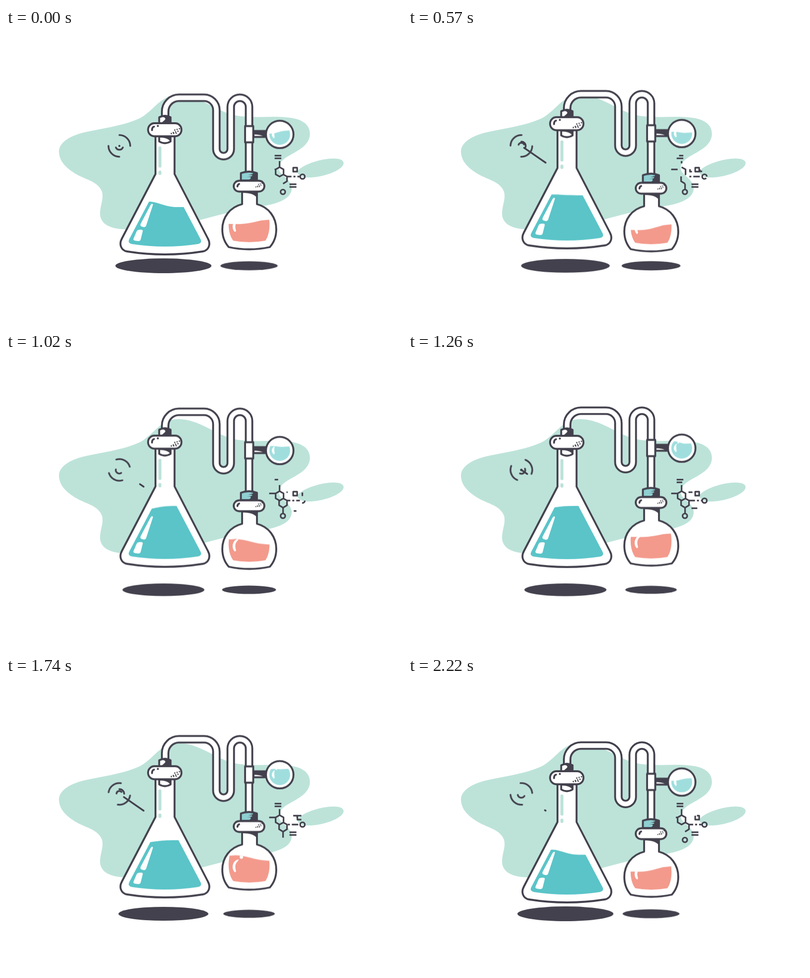
Recreate the animation shown at these times as an HTML page without scripts. Size 800x600 px, loop 2.25 s.

```html
<!DOCTYPE html>
<html lang="en">
<head>
<meta charset="utf-8">
<title>Distillation</title>
<style>
:root { --loop: 2250ms; --sine: cubic-bezier(.37,0,.63,1); }
html, body { margin: 0; width: 100%; height: 100%; overflow: hidden; background: #fff; }
svg { display: block; width: 100vw; height: 100vh; }
.ink { fill: none; stroke: #43414d; stroke-width: 3.8; stroke-linejoin: round; stroke-linecap: round; }
.glass { fill: #fff; }
.dark { fill: #43414d; stroke: none; }
.shine { fill: #fff; stroke: none; }
.mint { fill: #bde3d9; stroke: none; }

/* Parts rise and sink once per loop; --lag is the moment a part is lowest. */
.bob, .shadow {
  --low: 0px; --rise: 24px; --lag: 0ms;
  animation: bob calc(var(--loop) / 2) var(--sine) calc(var(--lag) - var(--loop)) infinite alternate;
}
.shadow { transform-box: fill-box; transform-origin: center; animation-name: shrink; }
@keyframes bob {
  from { transform: translateY(var(--low)); }
  to { transform: translateY(calc(var(--low) - var(--rise))); }
}
@keyframes shrink { to { transform: scale(.85); } }

/* Liquids rock three times per loop. */
.slosh { stroke: none; animation: calc(var(--loop) / 6) var(--sine) infinite alternate; }
.cone { fill: #5ac4c8; animation-name: cone; }
.round { fill: #f39a8c; animation-name: round; animation-delay: -485ms; }
.drop { fill: #a0dede; animation-name: drop; animation-delay: -323ms; }
@keyframes cone {
  from { d: path("M230-6H287C305-7 320 5 345 5Q365 5 410 4V130H230Z"); }
  to { d: path("M230 5H283C300 3 308-6 340-6Q365-6 410-5V130H230Z"); }
}
@keyframes round {
  from { d: path("M430-5H455C475-8 495 1 515 4Q530 6 550 6V70H430Z"); }
  to { d: path("M430 5H460C480 7 490 2 515-6Q530-9 550-9V70H430Z"); }
}
@keyframes drop {
  from { d: path("M525-3H537C545-4 552 4 562 3Q570 3 580 2V50H525Z"); }
  to { d: path("M525 3H537C545 3 552-2 562-3Q570-4 580-4V50H525Z"); }
}

/* Strokes wipe out and redraw, or flash in and out, at fraction --at of the loop. */
.molecule { stroke-width: 3.2; stroke-linecap: butt; }
.trim, .flash { animation: trim var(--loop) linear calc((var(--at) - 1) * var(--loop)) infinite; }
.flash { animation-name: flash; }
@keyframes trim {
  0% { stroke-dasharray: 100 999; stroke-dashoffset: 0; }
  12% { stroke-dasharray: 0 999; stroke-dashoffset: -100; }
  18% { stroke-dasharray: 0 999; stroke-dashoffset: 0; }
  30%, 100% { stroke-dasharray: 100 999; stroke-dashoffset: 0; }
}
@keyframes flash {
  0% { stroke-dasharray: 0 999; stroke-dashoffset: 0; }
  12%, 18% { stroke-dasharray: 100 999; stroke-dashoffset: 0; }
  30%, 100% { stroke-dasharray: 0 999; stroke-dashoffset: -100; }
}
.flow { stroke-dasharray: 13 4 4 4; animation: flow calc(var(--loop) / 2) linear infinite; }
@keyframes flow { from { stroke-dashoffset: 4; } to { stroke-dashoffset: -21; } }

.turn { animation: turn var(--loop) linear infinite; }
.back { animation: turn calc(var(--loop) / 2) linear infinite reverse; }
@keyframes turn { to { transform: rotate(360deg); } }
.smile, .ripple, .ray { animation: smile calc(var(--loop) / 2) linear infinite; }
.smile { vector-effect: non-scaling-stroke; }
.ripple { animation-name: ripple; }
.ray { animation-name: ray; }
@keyframes smile { 32% { transform: none; } 60% { transform: scale(.7); } }
@keyframes ripple {
  0% { r: .3px; stroke-dasharray: 360 360; animation-timing-function: ease-in; }
  32% { r: 2.8px; stroke-dasharray: 360 360; animation-timing-function: ease-out; }
  71% { visibility: visible; }
  72%, 100% { r: 12px; stroke-dasharray: 0 360; visibility: hidden; }
}
@keyframes ray {
  0% { stroke-dasharray: 0 999; stroke-dashoffset: 0; }
  50% { stroke-dasharray: 90 999; stroke-dashoffset: -10; }
  98% { visibility: visible; }
  99%, 100% { stroke-dasharray: 0 999; stroke-dashoffset: -100; visibility: hidden; }
}
</style>
</head>
<body>
<svg viewBox="0 0 800 600">
<defs>
  <clipPath id="coneClip"><path d="M303 325L249 428Q245 436 255 438Q321 448 387 438Q397 436 393 428L339 325Z"/></clipPath>
  <clipPath id="roundClip"><path d="M457 365C447 385 447 415 459 431Q491 437 524 431C535 415 535 385 525 365Z"/></clipPath>
  <clipPath id="bulbClip"><circle cx="553" cy="218.4" r="21"/></clipPath>
  <path id="tube" d="M321.5 197V170A28 28 0 0 1 349.5 142H400A25 25 0 0 1 425 167V246A14.5 14.5 0 0 0 454 246V160.500A18.5 18.5 0 0 1 491 160.500V313"/>
  <path id="speckles" stroke-width="2.8" stroke-dasharray="0 4.9" d="M341 207L351 204M338 212L349 209M334 214L348 213"/>
  <path id="hexagon" pathLength="100" d="M0-9.500L8-5V5L0 9.500L-8 5V-5Z"/>
</defs>

<g class="mint">
  <path d="M107 250C107 232 130 217 165 210C205 202 238 197 268 184C298 170 310 136 348 136C392 137 418 165 458 176C492 184 530 178 565 181C596 183 614 194 614 215C613 240 586 250 568 261C549 273 546 287 559 298C571 308 578 316 577 327C575 348 546 357 512 362C455 370 410 386 367 395C320 405 275 408 240 408C208 407 190 396 190 376C190 360 198 346 194 332C186 310 158 307 138 294C118 281 107 268 107 250Z"/>
  <path d="M588 292C594 280 625 268 652 265C672 263 683 267 682 275C680 286 655 297 632 301C610 305 592 304 588 292Z"/>
</g>

<g class="dark">
  <ellipse class="shadow" cx="318" cy="482" rx="97" ry="15"/>
  <ellipse class="shadow" style="--lag:375ms" cx="491" cy="482" rx="60" ry="9.4"/>
</g>

<!-- spinning target -->
<g class="ink" style="stroke-width:3.5" transform="translate(229 239)">
  <path class="turn" d="M0-22A22 22 0 0 1 22 0M0 22A22 22 0 0 1-22 0"/>
  <g class="back"><path class="smile" d="M7 3.200A7.600 7.600 0 0 1-7 3.200"/></g>
  <circle class="ripple" pathLength="360" transform="rotate(-90)"/>
  <path class="ray" pathLength="100" d="M0 0L49 34"/>
</g>

<!-- molecule -->
<g class="ink molecule" transform="translate(-.3 -.3)">
  <path class="trim" style="--at:.21" pathLength="100" d="M543 259H556.500"/>
  <path class="trim" style="--at:.28" pathLength="100" d="M543 264.500H556.500"/>
  <path class="trim" style="--at:.03" pathLength="100" d="M553 270V283"/>
  <use class="trim" style="--at:.03" href="#hexagon" x="553" y="292"/>
  <path class="trim" style="--at:.9" pathLength="100" d="M532 287H545"/>
  <path class="trim" style="--at:.1" pathLength="100" d="M560 297L568 301.500V311L560 316"/>
  <path class="trim" style="--at:.87" pathLength="100" d="M560 316L552 311V301"/>
  <path class="trim" style="--at:.85" pathLength="100" d="M560 316V328"/>
  <circle class="trim" style="--at:.64" pathLength="100" cx="559.700" cy="332.500" r="4.700"/>
  <path class="flow" d="M568 301.500H594"/>
  <circle class="trim" style="--at:.24" pathLength="100" cx="599.300" cy="301.500" r="4.700"/>
  <path class="trim" style="--at:.7" pathLength="100" d="M580.500 283.500V291.500H588.500V283.500Z"/>
  <path class="flash" style="--at:.02" pathLength="100" d="M574 283.500H570V291.500H574"/>
  <path class="flash" style="--at:.2" pathLength="100" d="M590 287V291H599V285"/>
  <path class="flash" style="--at:.42" pathLength="100" d="M567 284.500H575"/>
  <path class="flash" style="--at:.63" pathLength="100" d="M597 283.500H589V291.500H597"/>
  <path class="trim" style="--at:.28" pathLength="100" d="M573 317H587"/>
  <path class="trim" style="--at:.38" pathLength="100" d="M573 322.500H587"/>
</g>

<g class="bob ink" style="--lag:125ms;--rise:23px;stroke-linecap:butt">
  <use href="#tube" stroke-width="17"/>
  <use href="#tube" style="stroke:#fff;stroke-width:9.4px"/>
</g>

<!-- bulb -->
<g class="bob ink" style="--lag:250ms">
  <path class="glass" d="M500 211.500H527V223.500H500Z"/>
  <path class="dark" d="M500 211H527V223L519 222Q514 218.500 500 218.500Z"/>
  <rect class="glass" x="483" y="201.500" width="16.500" height="33"/>
  <circle class="glass" cx="553" cy="218.400" r="27.800"/>
  <g clip-path="url(#bulbClip)">
    <g class="bob" style="--lag:375ms;--low:216.6px;--rise:11px"><path class="slosh drop"/></g>
  </g>
  <path class="shine" d="M543 209C536 213 535 222 541 226C545 226 540 219 543 209Z"/>
  <circle class="shine" cx="546" cy="207" r="1.800"/>
</g>

<!-- conical flask -->
<g class="bob ink">
  <path class="glass" d="M302 215V296L234 427C228 438 232 451 245 453Q321 465 397 453C410 451 414 438 408 427L340.500 296V215"/>
  <g clip-path="url(#coneClip)">
    <g class="bob" style="--lag:125ms;--low:358.5px;--rise:21px"><path class="slosh cone"/></g>
  </g>
  <path class="shine" d="M292 359Q295 354 297 358L283 401Q281 405 276 403Q270 402 272 397ZM264 412Q266 408 275 409Q277 410 276 413L272 429Q271 432 267 432L260 431Q256 430 258 426Z"/>
  <path stroke="#bde3d9" stroke-width="6" d="M311 243V280M311 292V295"/>
  <path class="glass" d="M309.500 219V230Q321 237 332.500 230V219Z"/>
  <path class="dark" d="M309.500 219H332.500V231Q328 222 309.500 222Z"/>
  <path class="glass" d="M309.500 193V181Q321 175 332.500 181V193Z"/>
  <path class="dark" d="M332.500 193V181Q325 177 313 179Q326 182 320 187L313 193Z"/>
  <rect class="glass" x="287" y="193" width="67.500" height="26.500" rx="13"/>
  <path d="M295 207Q295 201 299 200M306.500 198.500h.5"/>
  <use href="#speckles"/>
</g>

<!-- round flask -->
<g class="bob ink" style="--lag:375ms;--low:6px">
  <path class="glass" d="M477 331V357C452 363 437 384 437 408C437 424 442 435 450 444Q491 453 533 444C541 435 546 424 546 408C546 384 531 363 507 357V331"/>
  <path class="dark" d="M479 332H507V344Q500 334 479 334Z"/>
  <g clip-path="url(#roundClip)">
    <g class="bob" style="--lag:500ms;--low:401px;--rise:17px"><path class="slosh round"/></g>
  </g>
  <path class="shine" d="M470 387C458 389 454 405 462 413Q466 413 464 408C462 400 464 394 469 390Z"/>
  <circle class="shine" cx="475.500" cy="382.500" r="3.400"/>
  <path d="M474.500 309V294Q491 288 507 294V309Z" fill="#8fd0d2"/>
  <path class="dark" d="M507 309V294Q500 291 490 292L499 294Q501 296 489 298H497Q500 301 486 302H494Q497 306 486 309Z"/>
  <rect class="glass" x="460" y="309.500" width="62" height="22" rx="11"/>
  <path d="M467.500 321Q468 317 471 316"/>
  <use href="#speckles" transform="translate(251 159.500) scale(.76)"/>
</g>
</svg>
</body>
</html>
```
